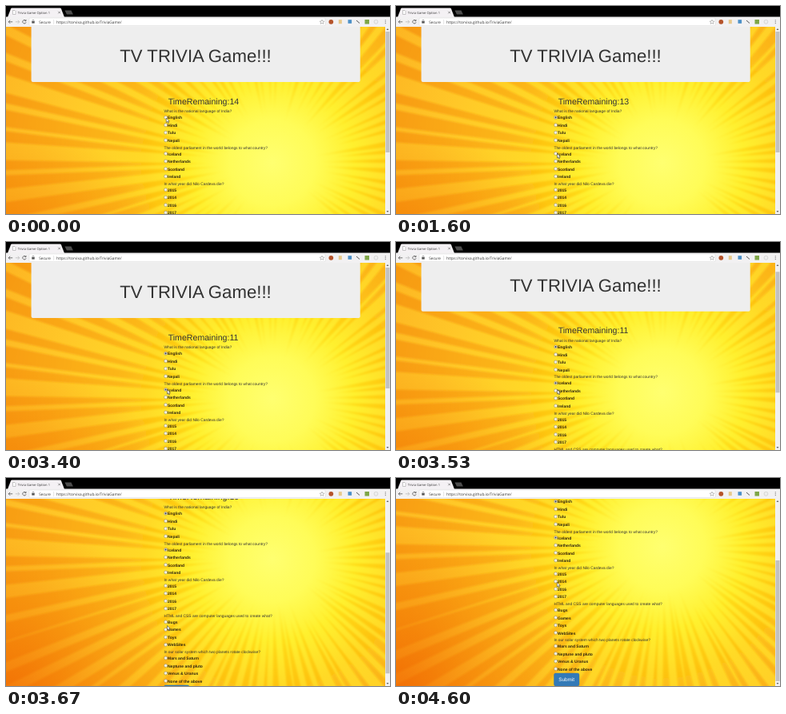
An HTML page for the animation above (4670 ms loop, 480 by 260 pixels).

```html
<!DOCTYPE html>
<html lang="en">
<head>
<meta charset="utf-8">
<title>Trivia Game Option 1</title>
<style>
  html, body { margin: 0; width: 100%; height: 100%; overflow: hidden; background: #000; }
  svg { display: block; width: 100%; height: 100%; }
  text { font-family: "Liberation Sans", Arial, sans-serif; fill: #333; text-rendering: geometricPrecision; }
  .ui { font-family: "Open Sans", "Noto Sans", sans-serif; }
  .q { font-size: 4.93px; }
  .opt { font-size: 5px; font-weight: bold; fill: #2b2410; }
</style>
</head>
<body>
<svg id="stage" viewBox="0 0 480 260">
  <defs>
    <clipPath id="view"><rect y="26" width="474" height="234"/></clipPath>
    <filter id="soft"><feGaussianBlur stdDeviation=".9"/></filter>
    <radialGradient id="glow" gradientUnits="userSpaceOnUse" cx="333" cy="196" r="380">
      <stop offset="0" stop-color="#ffff70"/>
      <stop offset=".14" stop-color="#fffc58"/>
      <stop offset=".27" stop-color="#fff02e"/>
      <stop offset=".42" stop-color="#ffda26"/>
      <stop offset=".7" stop-color="#ffc828"/>
      <stop offset="1" stop-color="#fdb422"/>
    </radialGradient>
    <radialGradient id="ray" gradientUnits="userSpaceOnUse" cx="333" cy="196" r="380">
      <stop offset=".14" stop-color="#ffd400" stop-opacity="0"/>
      <stop offset=".3" stop-color="#ffc400" stop-opacity=".5"/>
      <stop offset=".5" stop-color="#fbab10" stop-opacity=".7"/>
      <stop offset="1" stop-color="#f59210" stop-opacity=".85"/>
    </radialGradient>
    <radialGradient id="ember" gradientUnits="userSpaceOnUse" cx="0" cy="376" r="230">
      <stop offset="0" stop-color="#f06000" stop-opacity=".75"/>
      <stop offset="1" stop-color="#f58000" stop-opacity="0"/>
    </radialGradient>
  </defs>
  <g clip-path="url(#view)">
    <g id="page">
      <rect y="26" width="474" height="350" fill="url(#glow)"/>
      <g id="rays" fill="url(#ray)" filter="url(#soft)"></g>
      <rect y="26" width="474" height="350" fill="url(#ember)"/>
      <path d="M31.6 20H442.7V93a2 2 0 0 1-2 2H33.6a2 2 0 0 1-2-2z" fill="#eee"/>
      <text x="237" y="70" font-size="22.2" text-anchor="middle">TV TRIVIA Game!!!</text>
      <text id="timer" x="202.7" y="122.5" font-size="10.6"></text>
      <g id="quiz"></g>
      <rect x="197.5" y="354" width="31.5" height="16" rx="2" fill="#337ab7" stroke="#2e6da4" stroke-width=".4"/>
      <text x="213.2" y="364.2" font-size="6.4" text-anchor="middle" style="fill:#fff">Submit</text>
    </g>
  </g>
  <g id="scrollbar">
    <rect x="474" y="26" width="6" height="234" fill="#f1f1f1"/>
    <path d="M475.5 30l1.5-2 1.5 2zM475.5 256l1.5 2 1.5-2z" fill="#666"/>
    <rect id="thumb" x="474.5" y="32" width="5" height="151" fill="#c1c1c1"/>
  </g>
  <g id="browser">
    <rect width="480" height="14" fill="#000"/>
    <path d="M2 14L6 3.4Q6.4 2.5 7.5 2.5H67.5Q68.6 2.5 69 3.4L73 14z" fill="#f4f1f4"/>
    <path d="M73.5 5.5h8l2.4 5h-8z" fill="#4c4c4c"/>
    <path d="M8.5 5.5h2.5l1 1v4h-3.5z" fill="#fff" stroke="#777" stroke-width=".4"/>
    <text class="ui" x="14.8" y="9.7" font-size="4.1">Trivia Game Option 1</text>
    <path d="M65.3 6.8l2.6 2.6m0-2.6l-2.6 2.6" stroke="#555" stroke-width=".6"/>
    <rect y="13.5" width="480" height="12.5" fill="#f2f1f2"/>
    <rect x="29" y="15" width="370" height="9.6" rx="1" fill="#fff" stroke="#d0d0d0" stroke-width=".4"/>
    <g fill="none" stroke="#555" stroke-width=".8">
      <path d="M8.2 19.8h-5m2-2l-2 2 2 2"/>
      <path d="M11.8 19.8h5m-2-2l2 2-2 2" stroke="#bbb"/>
      <path d="M24.7 18.3a2.2 2.2 0 1 0 .4 2M25 17v1.7h-1.8"/>
      <path d="M33 19.2v-1a1 1 0 0 1 2 0v1" stroke-width=".5"/>
    </g>
    <rect x="32.3" y="19" width="3.4" height="2.6" fill="#555"/>
    <text class="ui" x="41.2" y="21.5" font-size="4.7">Secure</text>
    <path d="M59.6 17v6" stroke="#bbb" stroke-width=".4"/>
    <text class="ui" x="63" y="21.5" font-size="4.8">https://torvixa.github.io/TriviaGame/</text>
    <path d="M395 17.2l.8 1.8 2 .2-1.5 1.3.5 1.9-1.8-1-1.8 1 .5-1.9-1.5-1.3 2-.2z" fill="none" stroke="#666" stroke-width=".4"/>
    <circle cx="406.3" cy="19.8" r="2.9" fill="#b5532a"/>
    <rect x="415.8" y="17.2" width="4" height="5" fill="#e8c98a"/>
    <rect x="427.5" y="17.2" width="4.6" height="4.6" fill="#4b8fc6"/>
    <path d="M438 18l4 3.5" stroke="#555" stroke-width="1"/>
    <rect x="448.5" y="17" width="5.5" height="5.5" fill="#7fa648"/>
    <circle cx="462.5" cy="19.8" r="2.4" fill="#eee" stroke="#bbb" stroke-width=".5"/>
    <path d="M474.3 17.4v.9m0 1v.9m0 1v.9" stroke="#555" stroke-width=".9"/>
  </g>
  <path id="cursor" d="M0 0V5.6L1.3 4.4 2.2 6.5 3.1 6.1 2.2 4.1H4z" fill="#fff" stroke="#222" stroke-width=".5"/>
</svg>
<script>
const LOOP = 4670, SCROLL = 110;
const CENTER = { x: 333, y: 196 };
const QUIZ = [
  ["What is the national language of India?", "English", "Hindi", "Tulu", "Nepali"],
  ["The oldest parliament in the world belongs to what country?", "Iceland", "Netherlands", "Scotland", "Ireland"],
  ["In what year did Nilo Cardeva die?", "2015", "2014", "2016", "2017"],
  ["HTML and CSS are computer languages used to create what?", "Bugs", "Games", "Toys", "WebSites"],
  ["In our solar system which two planets rotate clockwise?", "Mars and Saturn", "Neptune and pluto", "Venus & Uranus", "None of the above"]
];

const $ = id => document.getElementById(id);
function add(parent, tag, attrs, text) {
  const el = document.createElementNS("http://www.w3.org/2000/svg", tag);
  for (const k in attrs) el.setAttribute(k, attrs[k]);
  if (text) el.textContent = text;
  return parent.appendChild(el);
}

function drawRays() {
  let seed = 11;
  const rnd = () => (seed = seed * 16807 % 2147483647) / 2147483647;
  const at = (a, r) => `${(CENTER.x + r * Math.cos(a)).toFixed(1)} ${(CENTER.y + r * Math.sin(a)).toFixed(1)}`;
  const n = 74, step = 2 * Math.PI / n;
  for (let i = 0; i < n; i++) {
    const a = (i + (rnd() - .5) * .4) * step;
    const half = step * (.22 + rnd() * .2);
    const tip = 40 + rnd() * 50;
    add($("rays"), "path", { d: `M${at(a, tip)}L${at(a - half, 480)}L${at(a + half, 480)}z` });
  }
}

function drawQuiz() {
  const quiz = $("quiz");
  return QUIZ.map(([question, ...options], i) => {
    const y = 131.6 + 45.2 * i;
    add(quiz, "text", { class: "q", x: 197.4, y: y + 1.8 }, question);
    return options.map((label, j) => {
      const oy = y + 8 + 9.5 * j;
      add(quiz, "circle", { cx: 199.6, cy: oy - .3, r: 2, fill: "#f4f1e4", stroke: "#8c8468", "stroke-width": .5 });
      add(quiz, "text", { class: "opt", x: 202, y: oy + 1.8 }, label);
      return add(quiz, "circle", { cx: 199.6, cy: oy - .3, r: 1.1, fill: "#3d4250", visibility: "hidden" });
    });
  });
}

function ease(t, from, to) {
  const u = Math.min(1, Math.max(0, (t - from) / (to - from)));
  return u * u * (3 - 2 * u);
}

drawRays();
const dots = drawQuiz();
const check = (dot, on) => dot.setAttribute("visibility", on ? "visible" : "hidden");

function render(t) {
  const scroll = SCROLL * ease(t, 3492, 3725);
  $("page").setAttribute("transform", `translate(0 ${-scroll})`);
  $("thumb").setAttribute("y", 32 + scroll * .645);
  $("timer").textContent = "TimeRemaining:" + (14 - Math.floor((t + 335) / 1000));
  check(dots[0][0], t >= 330);
  check(dots[1][0], t >= 2930);
  const down = ease(t, 1060, 1530), up = ease(t, 4000, 4500);
  $("cursor").setAttribute("transform", `translate(${200.3 + down * 1.2 - up * .2} ${140 + down * 44.5 - up * 54})`);
}

function tick() {
  render(performance.now() % LOOP);
  requestAnimationFrame(tick);
}
tick();
</script>
</body>
</html>
```
